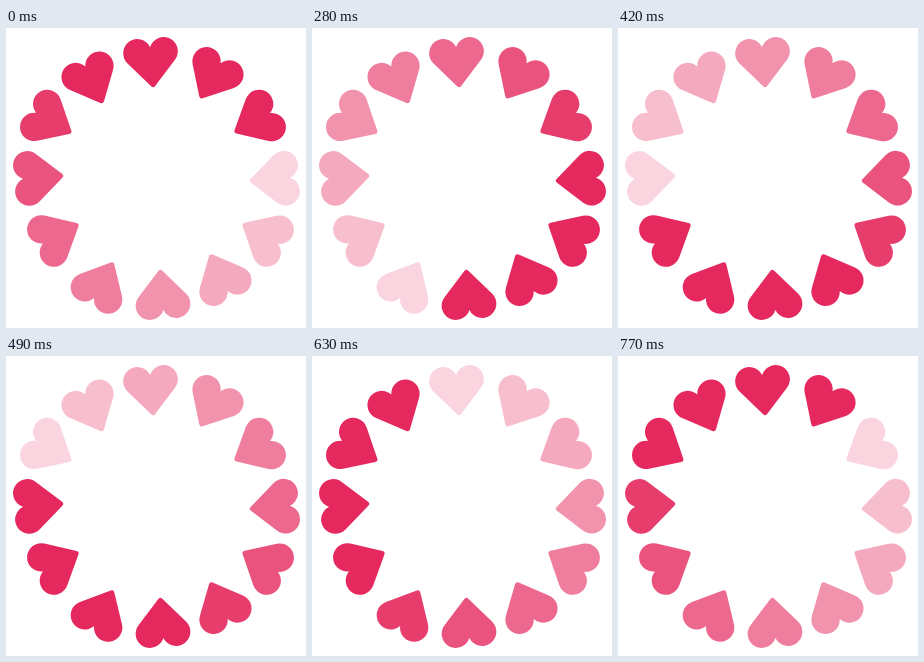
Write an HTML page that moves like this. It is 300 px wide and 300 px high and loops after 0.84 s.

```html
<!DOCTYPE html>
<html lang="en">
<head>
<meta charset="utf-8">
<title>Heart spinner</title>
<style>
  html, body { margin: 0; width: 100%; height: 100%; overflow: hidden; background: #fff; }
  svg { display: block; width: 100vw; height: 100vh; }
</style>
</head>
<body>
<svg id="stage" viewBox="0 0 300 300" fill="#e5295e"></svg>
<script>
const STEP = 70;
const HEART = 'M0-5.2A14.2 14.2 0 1 1 23.8 9.5L2 34.1Q0 36.3-2 34.1L-23.8 9.5A14.2 14.2 0 1 1 0-5.2Z';

// x, y, rotation, clockwise from the top
const places = [
  [144.5, 24.2, -4.5], [212, 39.8, 30], [259.5, 87.5, 61.5],
  [278.8, 150.2, 85.5], [267.3, 213.2, 119.5], [219.5, 258.2, 154.5],
  [157, 276.8, 175.5], [90.5, 265.5, 208], [41.5, 213, 241.5],
  [22.2, 150.4, 265.5], [34.6, 87.4, 299.5], [81.5, 43.3, 334.5]
];
const count = places.length;
const stage = document.getElementById('stage');

const hearts = places.map(([x, y, turn]) => {
  const heart = document.createElementNS('http://www.w3.org/2000/svg', 'path');
  heart.setAttribute('d', HEART);
  heart.setAttribute('transform', `translate(${x} ${y}) rotate(${turn})`);
  return stage.appendChild(heart);
});

function draw(time) {
  const palest = 3 + Math.floor(time / STEP) % count;
  hearts.forEach((heart, i) => {
    const lag = (i - palest + 2 * count) % count;
    heart.setAttribute('fill-opacity', Math.min(1, 0.2 + lag * 0.1).toFixed(1));
  });
}

const start = performance.now();
function tick() {
  draw(performance.now() - start);
  requestAnimationFrame(tick);
}
tick();
</script>
</body>
</html>
```
